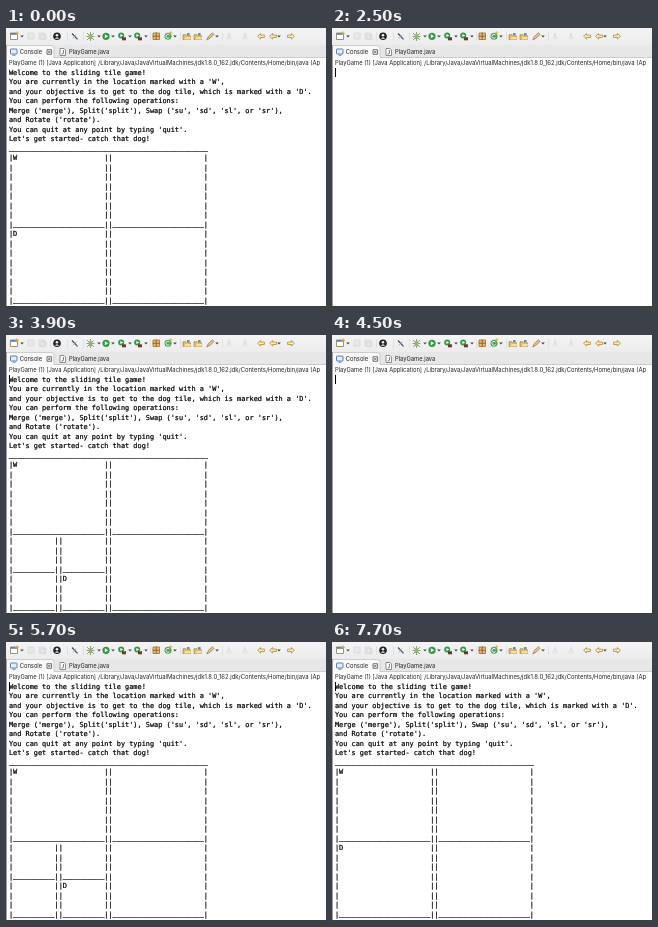
An HTML page that plays this animation: 320x279 px, repeating every 8 s.

```html
<!DOCTYPE html>
<html lang="en">
<head>
<meta charset="utf-8">
<title>Sliding tile game</title>
<style>
html, body { margin: 0; width: 100%; height: 100%; overflow: hidden; background: #fff; }
svg { display: block; width: 320px; height: 279px; }
.ui { font: 5.8px Inter, "Liberation Sans", sans-serif; fill: #222; }
.path { font-size: 5.92px; }
.mono { font: 6.9px "DejaVu Sans Mono", monospace; fill: #000; stroke: #000; stroke-width: .22px; }
.mono text { white-space: pre; }
#output { animation: output 8s step-end infinite; }
#whole { animation: whole 8s step-end infinite; }
#split { animation: split 8s step-end infinite; }
#caret { animation: caret 8s step-end infinite; }
@keyframes output {
  0%, 22.5%, 32.5%, 46.25%, 58.75%, 70%, 83.75%, 95%, 100% { opacity: 1; }
  18.75%, 31.25%, 43.75%, 56.25%, 67.5%, 80%, 92.5% { opacity: 0; }
}
@keyframes whole {
  0%, 92.5%, 100% { opacity: 1; }
  43.75% { opacity: 0; }
}
@keyframes split {
  0%, 92.5%, 100% { opacity: 0; }
  43.75% { opacity: 1; }
}
@keyframes caret {
  0%, 27.5%, 36.25%, 52.5%, 65%, 76.25%, 90% { opacity: 0; }
  16.25%, 31.25%, 43.75%, 56.25%, 67.5%, 80%, 92.5%, 100% { opacity: 1; }
}
</style>
</head>
<body>
<svg viewBox="0 0 320 279">
  <defs>
    <linearGradient id="bar" x2="0" y2="1">
      <stop stop-color="#f4f4f4"/><stop offset="1" stop-color="#ececec"/>
    </linearGradient>
    <path id="drop" d="M-1.8 -.9h3.6L0 1.3z" fill="#444"/>
    <g id="run"><circle r="3.6" fill="#2f9a45"/><path d="M-1.2 -2L2.2 0L-1.2 2z" fill="#fff"/></g>
    <g id="runbox">
      <circle cx="-.8" cy="-.8" r="3" fill="#2f9a45"/>
      <path d="M-1.7 -2.4L1.2 -.8L-1.7 .8z" fill="#fff"/>
      <rect x="0" y="1" width="4" height="3" fill="#6d382e"/>
    </g>
    <g id="folder">
      <path d="M-4 3.2V-1.6h3l1 1h3.4v3.8z" fill="#e6bd62" stroke="#98753a" stroke-width=".6"/>
      <path d="M-3 3.2L-1.2 .6H4.4L3 3.2z" fill="#f8dfa0"/>
      <rect x="0" y="-3.2" width="2.6" height="2" fill="#6684ae"/>
    </g>
    <path id="arrow" d="M-3.4 0L-.4 -2.8V-1.2H3.4V1.2H-.4V2.8z" fill="#fbeab8" stroke="#b08a3a" stroke-width=".8"/>
    <g id="faint" fill="none" stroke="#dadada" stroke-width=".8">
      <path d="M-2.2 3L0 -3L2.2 3M0 -3V3"/>
    </g>
  </defs>

  <rect width="320" height="279" fill="#fff"/>
  <rect width="320" height="17" fill="url(#bar)"/>
  <rect y="17" width="320" height="13" fill="#e7e7e7"/>
  <path d="M0 30V18.5Q0 17.5 1 17.5H45Q48 17.5 48 20V30z" fill="#f9f9f9"/>
  <path d="M0 17.5H45Q48 17.5 48 20V29.5H320" fill="none" stroke="#c4c4c4" stroke-width=".8"/>
  <path d="M.5 17V279" stroke="#a0a0a0"/>
  <path d="M0 278.5H320" stroke="#3c3c3c"/>

  <g id="tools">
    <path d="M4.5 5h7v6.5h-7z" fill="#fff" stroke="#8d7a50" stroke-width=".8"/>
    <path d="M4.5 5h7v1.8h-7z" fill="#5b83b5"/>
    <path d="M11 3.4v3.8M9.1 5.3h3.8" stroke="#d9a72c"/>
    <g fill="#e8e8e8" stroke="#d6d6d6" stroke-width=".8">
      <path d="M22 5h6v6h-6zM33 5h5.5v6H33zM35 6.7h5v5h-5z"/>
    </g>
    <path d="M44.5 4v9M61.5 4v9M77.5 4v9M144.5 4v9M174.5 4v9M216.5 4v9" stroke="#d8d8d8" stroke-width=".7"/>
    <circle cx="51" cy="8.3" r="3.8" fill="#20242b"/>
    <circle cx="51" cy="7.2" r="1.3" fill="#eee"/>
    <path d="M48.8 10.8Q51 7.6 53.2 10.8z" fill="#eee"/>
    <path d="M66 5.5L71.5 11.3" stroke="#35506e" stroke-width="1.2"/>
    <path d="M67 10.3l3 -3.6" stroke="#8ba0b8" stroke-width=".8"/>
    <path d="M81 5l7 7M88 5l-7 7M80.5 8.5h8M84.5 4v9" stroke="#667a59" stroke-width=".7"/>
    <ellipse cx="84.5" cy="8.5" rx="2" ry="2.7" fill="#8fb66c"/>
    <path d="M147 5h6.5v6.5H147z" fill="#e7bd71" stroke="#a26d2a" stroke-width=".8"/>
    <path d="M150.2 4.5v7M146.6 8.2h7" stroke="#8f5825" stroke-width=".9"/>
    <circle cx="162" cy="8.3" r="3.5" fill="#4ba35b"/>
    <path d="M163.5 7a2 2 0 1 0 0 2.6" fill="none" stroke="#fff" stroke-width=".9"/>
    <path d="M164.7 3.2v3.4M163 4.9h3.4" stroke="#dba932" stroke-width=".8"/>
    <path d="M200.8 12L202.4 8.4L206.4 4.8L208 6.4L204.4 10z" fill="#e5c387" stroke="#927446" stroke-width=".7"/>
  </g>

  <g class="ui">
    <rect x="4.5" y="21" width="6.5" height="5" rx=".6" fill="#e4eefa" stroke="#4a70a8" stroke-width=".9"/>
    <path d="M6.5 27.3h3" stroke="#4a70a8" stroke-width=".8"/>
    <text x="13.7" y="26.1">Console</text>
    <path d="M41 21.7h4.6v4.6H41zM42 22.7l2.6 2.6M44.6 22.7L42 25.3" fill="none" stroke="#555" stroke-width=".8"/>
    <path d="M54 20.5h4l1.5 1.5v5.5H54z" fill="#fff" stroke="#7d7460" stroke-width=".8"/>
    <path d="M57.4 22v3q0 1.3 -1.8 1" fill="none" stroke="#416fa8" stroke-width=".9"/>
    <text x="63" y="26.1">PlayGame.java</text>
    <text x="3" y="37.1">PlayGame (1) [Java Application]</text>
    <text class="path" x="92" y="37.1">/Library/Java/JavaVirtualMachines/jdk1.8.0_162.jdk/Contents/Home/bin/java (Ap</text>
  </g>

  <g id="output" class="mono">
    <g id="intro"></g>
    <g id="whole"></g>
    <g id="split"></g>
  </g>
  <rect id="caret" x="3" y="40" width="1" height="9" fill="#000"/>
</svg>
<script>
const NS = "http://www.w3.org/2000/svg";
const $ = id => document.getElementById(id);

function add(parent, tag, attrs, text = "") {
  const el = document.createElementNS(NS, tag);
  for (const key in attrs) el.setAttribute(key, attrs[key]);
  el.textContent = text;
  parent.append(el);
}

// Underscores sit slightly higher than the font would place them.
function print(id, lines, first) {
  lines.forEach((line, i) => {
    const y = 46.8 + (first + i) * 9.5;
    add($(id), "text", { x: 2.9, y }, line.replace(/_/g, " "));
    if (line.includes("_")) add($(id), "text", { x: 2.9, y: y - 0.9 }, line.replace(/[^_]/g, " "));
  });
}

// A tile is a list of strings; the last row carries its floor.
function tile(width, height, mark = " ") {
  return Array.from({ length: height }, (_, row) => {
    const fill = row === height - 1 ? "_" : " ";
    const start = row === 0 ? mark : fill;
    return "|" + start + fill.repeat(width - 3) + "|";
  });
}

const beside = (a, b) => a.map((row, i) => row + b[i]);
const big = mark => tile(24, 8, mark);
const small = mark => tile(12, 4, mark);

print("intro", [
  "Welcome to the sliding tile game!",
  "You are currently in the location marked with a 'W',",
  "and your objective is to get to the dog tile, which is marked with a 'D'.",
  "You can perform the following operations:",
  "Merge ('merge'), Split('split'), Swap ('su', 'sd', 'sl', or 'sr'),",
  "and Rotate ('rotate').",
  "You can quit at any point by typing 'quit'.",
  "Let's get started- catch that dog!",
  "_".repeat(48),
  ...beside(big("W"), big())
], 0);

const quarters = [...beside(small(), small()), ...beside(small(), small("D"))];
print("whole", beside(big("D"), big()), 17);
print("split", beside(quarters, big()), 17);

function icon(name, x, extra = "") {
  add($("tools"), "use", { href: "#" + name, transform: `translate(${x} 8.3) ${extra}` });
}
[16, 93, 107, 124, 140, 169, 211, 273].forEach(x => icon("drop", x));
icon("run", 100);
[116, 132].forEach(x => icon("runbox", x));
[181, 192].forEach(x => icon("folder", x));
[223, 239].forEach(x => icon("faint", x));
[255, 267].forEach(x => icon("arrow", x));
icon("arrow", 285, "scale(-1 1)");
</script>
</body>
</html>
```
